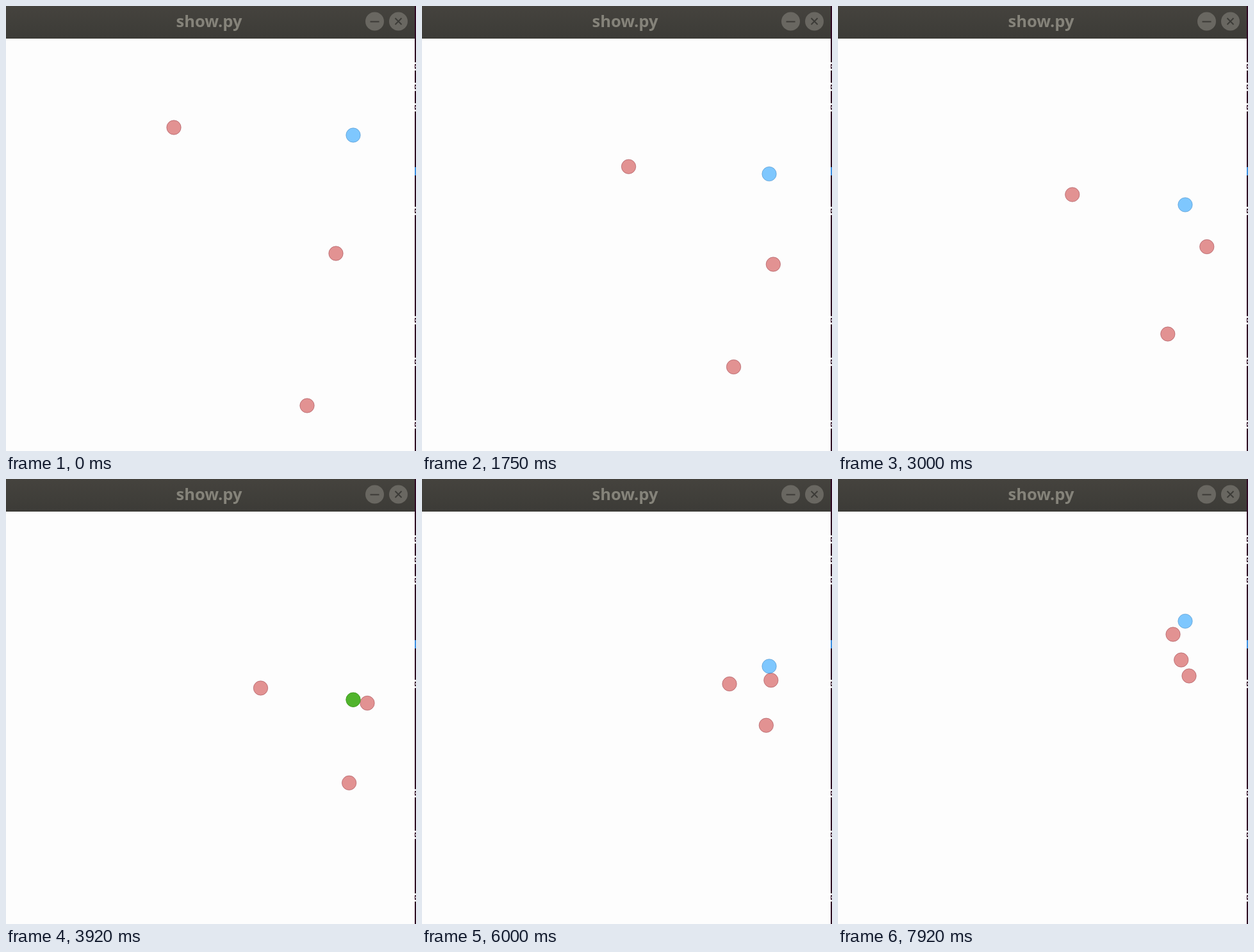
An HTML page with a canvas for the animation above (8 s loop, 640 by 696 pixels).

```html
<!DOCTYPE html>
<html lang="en">
<head>
<meta charset="utf-8">
<title>show.py</title>
<style>
  html, body { margin: 0; width: 100%; height: 100%; overflow: hidden; background: #fdfdfd; }
  canvas { position: absolute; left: 0; top: 0; }
  h1 {
    position: absolute; left: 217px; top: 6px; width: 200px; margin: 0;
    font: bold 25.5px/34px "Noto Sans", "Open Sans", sans-serif;
    text-align: center; color: #85837a;
  }
</style>
</head>
<body>
<canvas id="stage" width="640" height="696"></canvas>
<h1>show.py</h1>
<script>
const ctx = document.getElementById('stage').getContext('2d');
const LOOP = 8000, TICK = 1000 / 12;
const HIT = 46, LEAVE = 56.5;

// Turning points of each chaser: [tick, x, y].
const chasers = [
  [[0, 262, 190], [47, 397.5, 327], [62, 445, 342], [82, 515, 299], [95, 535.7, 283]],
  [[0, 515, 387], [21, 548.3, 404], [36, 575.8, 376.5], [47, 564, 350.5],
   [62, 562, 343.5], [82, 527.6, 286], [95, 523, 243]],
  [[0, 470, 625], [21, 486.5, 564.5], [47, 535.6, 475.3],
   [62, 534.4, 424], [82, 540.2, 346.5], [95, 548, 308]]
];

function along(path, n) {
  const i = Math.max(1, path.findIndex(p => p[0] >= n));
  const [t0, x0, y0] = path[i - 1], [t1, x1, y1] = path[i];
  const u = (n - t0) / (t1 - t0);
  return [x0 + (x1 - x0) * u, y0 + (y1 - y0) * u];
}

// Runs down, waits after the hit, then runs back up.
function targetY(n) {
  const down = Math.min(n, HIT), up = Math.max(0, n - LEAVE);
  return 202 + down * (2.7 + 0.009 * down) - up * (3.5 - 0.008 * up);
}

function disc(x, y, r, fill, edge) {
  ctx.beginPath();
  ctx.arc(x, y, r, 0, 2 * Math.PI);
  ctx.fillStyle = fill;
  ctx.fill();
  if (edge) {
    ctx.strokeStyle = edge;
    ctx.lineWidth = 1;
    ctx.stroke();
  }
}

function rect(color, x, y, w, h) {
  ctx.fillStyle = color;
  ctx.fillRect(x, y, w, h);
}

function line(x1, y1, x2, y2) {
  ctx.beginPath();
  ctx.moveTo(x1, y1);
  ctx.lineTo(x2, y2);
  ctx.stroke();
}

// Sliver of the window behind, with the edges of a few text rows.
function drawEdge() {
  rect('#300a24', 638, 0, 2, 696);
  for (const y of [88, 120, 152, 314, 485, 550, 648])
    for (let k = 0; k < 3; k++) rect('#e8e4e8', 638 + k % 2, y + k * 5, 2, 3);
  rect('#3d8fe0', 638, 252, 2, 13);
}

function drawWindow() {
  rect('#fdfdfd', 0, 0, 640, 696);
  const bar = ctx.createLinearGradient(0, 0, 0, 51);
  bar.addColorStop(0, '#45433e');
  bar.addColorStop(1, '#3c3b37');
  rect(bar, 0, 0, 640, 51);

  disc(575.5, 24, 14.5, '#696761');
  disc(612.5, 24, 14.5, '#696761');
  ctx.strokeStyle = '#3c3b37';
  ctx.lineWidth = 2;
  line(568.5, 24.5, 582.5, 24.5);
  line(607.5, 19, 617.5, 29);
  line(617.5, 19, 607.5, 29);
  drawEdge();
}

function draw(now) {
  const n = Math.floor((now % LOOP + 5) / TICK) % 96;
  const waiting = n >= HIT && n < LEAVE;

  drawWindow();
  for (const path of chasers)
    disc(...along(path, n), 11.2, 'rgba(200, 40, 40, 0.5)', 'rgba(150, 60, 70, 0.5)');
  disc(542, targetY(n), 11.2,
       waiting ? '#50b42c' : 'rgba(0, 145, 255, 0.5)',
       waiting ? '#429c24' : 'rgba(60, 130, 190, 0.5)');
}

const start = performance.now();
function loop() {
  draw(performance.now() - start);
  requestAnimationFrame(loop);
}
loop();
</script>
</body>
</html>
```
